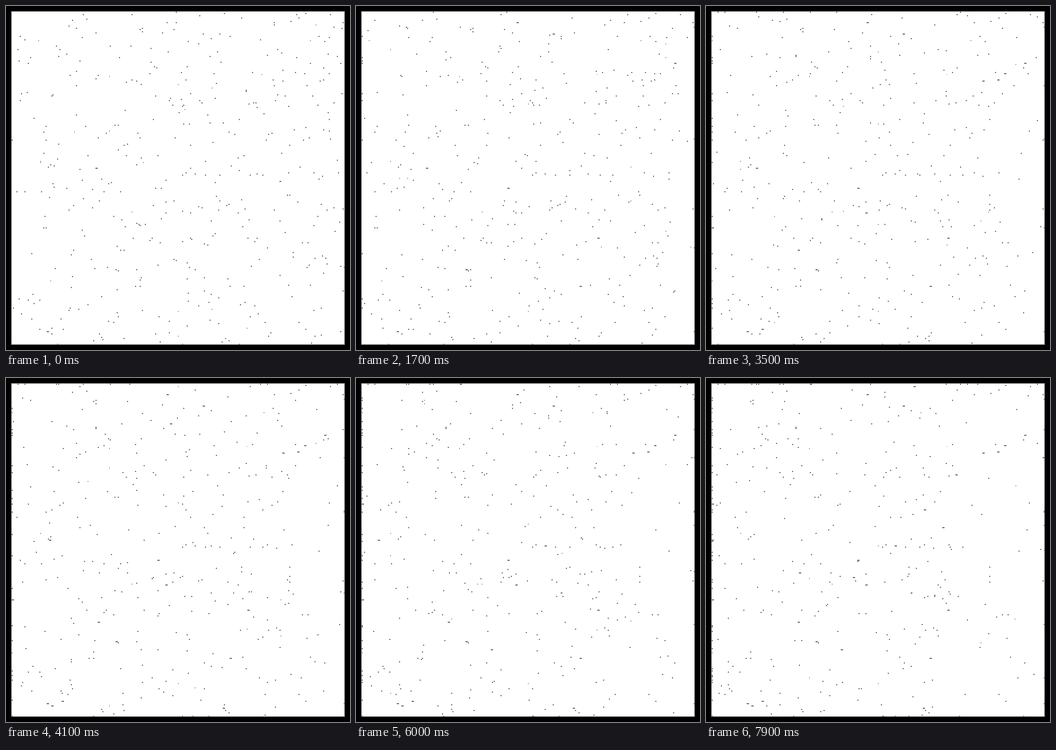
Write an HTML page with a canvas that moves like this. It is 600 px wide and 600 px high and loops after 8 s.

```html
<!DOCTYPE html>
<html>
<head>
<meta charset="utf-8">
<style>
  html, body { margin: 0; width: 100%; height: 100%; overflow: hidden; background: #000; }
  canvas { display: block; }
</style>
</head>
<body>
<canvas id="stage" width="600" height="600"></canvas>
<script>
const ctx = document.getElementById('stage').getContext('2d');
const SIZE = 600, CELLS = 305, FIRST = 5, LAST = 299, COUNT = 430;
const STEP_MS = 100, LOOP_MS = 8000;

const edge = cell => Math.ceil(cell * SIZE / CELLS);
const key = (x, y) => y * CELLS + x;
const inside = v => v >= FIRST && v <= LAST;

function seeded(seed) {
  return () => {
    seed = (seed * 1664525 + 1013904223) >>> 0;
    return seed / 4294967296;
  };
}

// Some particles rest, most drift left, a few go the other ways
function heading(r) {
  if (r < 0.3) return [0, 0];
  if (r < 0.75) return [-1, 0];
  if (r < 0.82) return [1, 0];
  return r < 0.91 ? [0, -1] : [0, 1];
}

function startState() {
  const random = seeded(2024);
  const place = () => FIRST + Math.floor(random() * (LAST - FIRST + 1));
  return Array.from({ length: COUNT }, () => {
    const x = place(), y = place(), [dx, dy] = heading(random());
    return { x, y, dx, dy };
  });
}

// Each particle moves one cell per step and sticks to walls and others
function simulate(steps) {
  const list = startState();
  const taken = new Set(list.map(p => key(p.x, p.y)));
  for (let s = 0; s < steps; s++) {
    for (const p of list) {
      if (!p.dx && !p.dy) continue;
      const x = p.x + p.dx, y = p.y + p.dy;
      if (!inside(x) || !inside(y) || taken.has(key(x, y))) {
        p.dx = p.dy = 0;
        continue;
      }
      taken.delete(key(p.x, p.y));
      taken.add(key(x, y));
      p.x = x;
      p.y = y;
    }
  }
  return list;
}

function square(inset, color) {
  ctx.fillStyle = color;
  ctx.fillRect(inset, inset, SIZE - 2 * inset, SIZE - 2 * inset);
}

function draw(step) {
  square(0, '#000');
  square(9, '#888');
  square(10, '#fff');
  ctx.fillStyle = '#777';
  for (const { x, y } of simulate(step)) {
    const px = edge(x), py = edge(y);
    ctx.fillRect(px, py, edge(x + 1) - px, edge(y + 1) - py);
  }
}

let shown = -1;
const start = performance.now();
function tick() {
  const step = Math.floor((performance.now() - start) % LOOP_MS / STEP_MS);
  if (step !== shown) draw(shown = step);
  requestAnimationFrame(tick);
}
tick();
</script>
</body>
</html>
```
